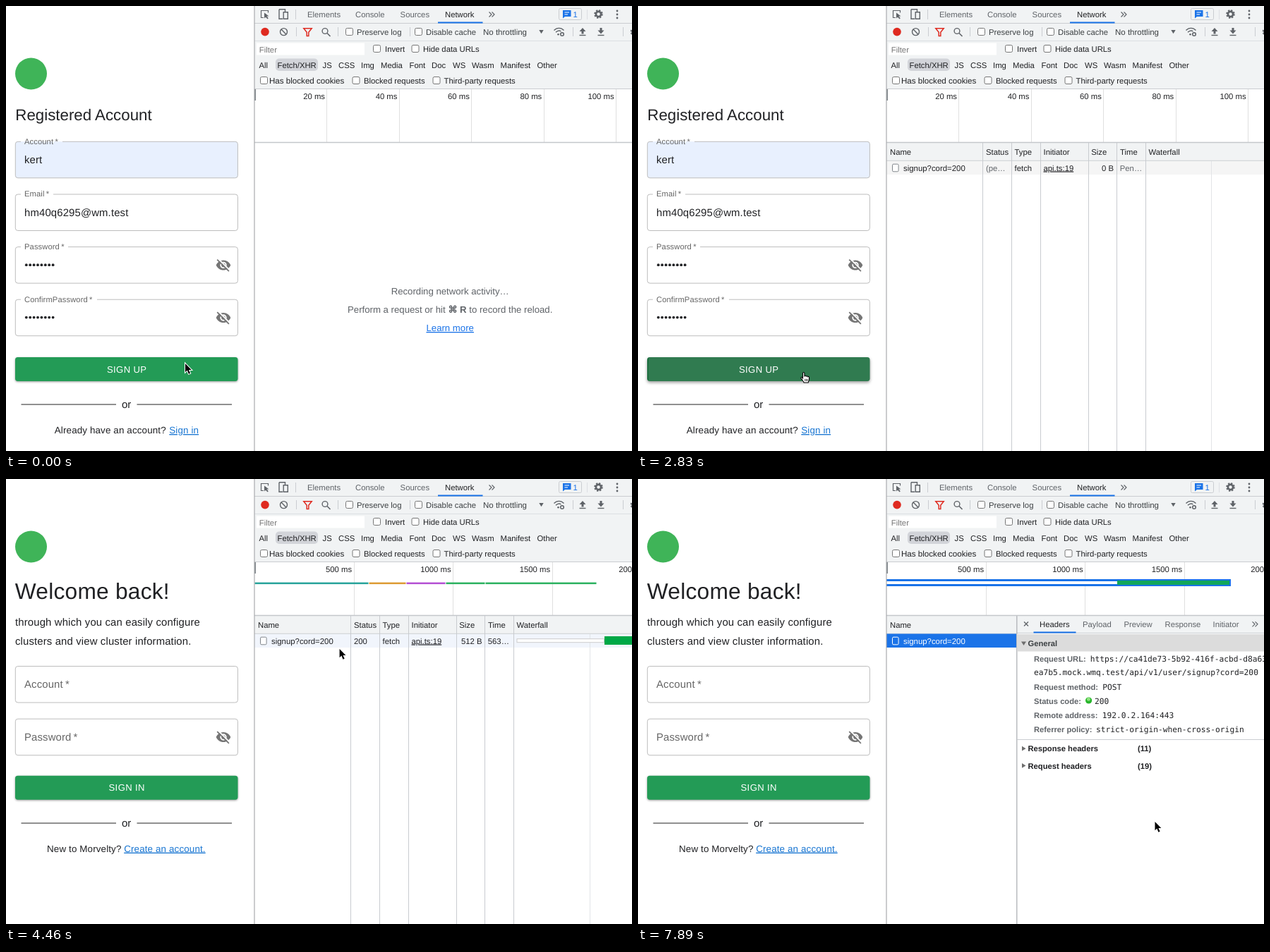
These frames come from a looping animation (887x631 px, 8000 ms). An HTML page:

```html
<!DOCTYPE html>
<html lang="en">
<head>
<meta charset="utf-8">
<title>Sign up flow</title>
<style>
html, body { margin: 0; width: 100%; height: 100%; overflow: hidden; background: #fff; }
svg { display: block; font-family: "Liberation Sans", Arial, sans-serif; text-rendering: geometricPrecision; }
text { white-space: pre; }
.mono { font-family: "DejaVu Sans Mono", monospace; }
.tip { font-family: Inter, sans-serif; }
.b { font-weight: 700; }
.u { text-decoration: underline; }
</style>
</head>
<body>
<svg id="stage" width="887" height="631" viewBox="0 0 887 631"></svg>
<script>
const INK = '#202124', GREY = '#5f6368', LINE = '#cacdd1', BAR = '#f1f3f4', BLUE = '#1a73e8';
const LIGHT = [35, 155, 86], DARK = [24, 108, 60];

// ---- drawing helpers ----
const text = (x, y, s, { size = 11.3, fill = INK, cls = '', anchor = 'start', ls = 0 } = {}) =>
  `<text x="${x}" y="${y}" font-size="${size}" fill="${fill}" class="${cls}" text-anchor="${anchor}" letter-spacing="${ls}">${s}</text>`;
const rect = (x, y, w, h, fill, extra = '') =>
  `<rect x="${x}" y="${y}" width="${w}" height="${h}" fill="${fill}" ${extra}/>`;
const path = (d, stroke = GREY, w = 1.3, fill = 'none') =>
  `<path d="${d}" stroke="${stroke}" stroke-width="${w}" fill="${fill}"/>`;
const circle = (x, y, r, fill, extra = '') => `<circle cx="${x}" cy="${y}" r="${r}" fill="${fill}" ${extra}/>`;
const hline = (x1, x2, y, c = LINE, w = 1) => path(`M${x1} ${y}H${x2}`, c, w);
const vline = (x, y1, y2, c = LINE, w = 1) => path(`M${x} ${y1}V${y2}`, c, w);
const group = (id, body) => `<g id="${id}">${body}</g>`;
const row = (y, items, opt) => items.map(([x, s]) => text(x, y, s, opt)).join('');
const check = (x, y) => rect(x + .5, y + .5, 10, 10, '#fff', 'rx="2" stroke="#767676"');
const more = (x, y) => path(`M${x} ${y - 3.5}l3.5 3.5l-3.5 3.5M${x + 4} ${y - 3.5}l3.5 3.5l-3.5 3.5`, GREY, 1.2);
const gear = (x, y) => circle(x, y, 3.6, 'none', `stroke="${GREY}" stroke-width="2.6"`) +
  circle(x, y, 5.4, 'none', `stroke="${GREY}" stroke-width="1.8" stroke-dasharray="2.3 1.94"`);

// ---- left pages ----
const body = { size: 14.9, ls: .14 };
const small = { size: 13.4, ls: .13 };

function eye(y) {
  return `<g transform="translate(296.8 ${y - 11.2}) scale(.935)">
    <path fill="#757575" fill-rule="evenodd" d="M1 12C2.7 7.6 7 4.5 12 4.5S21.3 7.6 23 12C21.3 16.4 17 19.5 12 19.5S2.7 16.4 1 12ZM7 12a5 5 0 0 0 10 0a5 5 0 0 0 -10 0Z"/>
    ${circle(12, 12, 3, '#757575')}
    ${path('M4 2.2L22 20.2', '#fff', 2)}${path('M2.6 3.6L20.4 21.4', '#757575', 1.9)}</g>`;
}

// Outlined field; the top border is open between x = 21 and gap.
function field(y, label, gap, fill = 'none') {
  const l = 13.3, r = 328.4, b = y + 51.5, k = 3.6;
  const start = gap || 21;
  const edge = `M${start} ${y}H${r - k}q${k} 0 ${k} ${k}V${b - k}q0 ${k} ${-k} ${k}H${l + k}q${-k} 0 ${-k} ${-k}V${y + k}q0 ${-k} ${k} ${-k}H21`;
  return rect(l, y, r - l, 51.5, fill, `rx="${k}"`) + path(edge, '#bdbdbd', 1) +
    (gap ? text(26, y + 3.4, label + '\u2009*', { size: 11.2, ls: .1, fill: '#666' })
         : text(26, y + 30.6, label + '\u2009*', { ...body, fill: '#666' }));
}
const dots = y => Array.from({ length: 8 }, (_, i) => circle(28.8 + 5.4 * i, y, 1.9, INK)).join('');
const divider = y => hline(21.5, 156, y, '#6b6b6b', 1.5) + hline(185.5, 320, y, '#6b6b6b', 1.5) +
  text(170.7, y + 5, 'or', { size: 15, anchor: 'middle' });
const button = (id, y) => rect(13, y, 315.5, 34, `rgb(${LIGHT})`, `id="${id}" rx="3.7"`);
const caption = (y, s) => text(171.2, y, s, { size: 13.1, ls: .37, fill: '#fff', anchor: 'middle' });

const signUp = text(13.3, 162, 'Registered Account', { size: 22.3 }) +
  field(192.3, 'Account', 80, '#e8f0fe') + text(26, 223.2, 'kert', body) +
  field(267, 'Email', 67) + text(26, 298, 'hm40q6295@wm.test', body) +
  field(341.6, 'Password', 88) + dots(367.2) + eye(367.4) +
  field(416.2, 'ConfirmPassword', 129) + dots(441.6) + eye(442) +
  button('btn', 498) +
  `<clipPath id="clip">${rect(13, 498, 315.5, 34, '#fff', 'rx="3.7"')}</clipPath>` +
  `<g clip-path="url(#clip)"><circle id="ripple" cx="235.5" cy="516.5" fill="#fff"/></g>` +
  caption(519.6, 'SIGN UP') + divider(565) +
  text(68.8, 606, 'Already have an account?', small) +
  text(231.3, 606, 'Sign in', { ...small, fill: '#1976d2', cls: 'u' });

const signIn = text(12.8, 169.6, 'Welcome back!', { size: 31.7, ls: .23 }) +
  text(13, 208.4, 'through which you can easily configure', body) +
  text(13, 234.6, 'clusters and view cluster information.', body) +
  field(265.5, 'Account') + field(340.2, 'Password') + eye(366) +
  button('btnIn', 420.7) + caption(442.2, 'SIGN IN') + divider(488) +
  text(58, 528.6, 'New to Morvelty?', small) +
  text(167.2, 528.6, 'Create an account.', { ...small, fill: '#1976d2', cls: 'u' });

// ---- developer tools ----
const tools = rect(352, 0, 535, 118, BAR) +
  hline(352, 887, 24.5) + hline(352, 887, 49.5, '#dcdfe3') + hline(352, 887, 117.5) +
  path('M365 16.5H361.5V6.5H371.5V9.5', GREY, 1.2) + path('M366 9.5V17.5L368 15.7L370.5 18.5L371.8 17.2L369.4 14.6H372.5Z', 'none', 0, GREY) +
  path('M387 4.7H395.5V8M387 4.7V18.3H392', GREY, 1.4) + path('M393.2 8.7H399.3V18.3H393.2Z', GREY, 1.4) +
  vline(410.5, 5, 19) +
  row(16, [[427, 'Elements'], [495, 'Console'], [558.6, 'Sources']], { fill: GREY }) +
  text(622, 16, 'Network') + rect(612, 22.5, 63.5, 2, BLUE) + more(684.5, 12) +
  rect(783.5, 3.5, 32, 16, BAR, `rx="2" stroke="${LINE}"`) +
  path('M789 6H800.5V15H792L789 17.5Z', 'none', 0, BLUE) + path('M791.5 9H798M791.5 12H796', '#fff', 1) +
  text(803.5, 15.5, '1', { fill: BLUE }) + vline(823.5, 5, 19, '#dcdfe3') + gear(839.5, 11.5) +
  [7, 12, 17].map(y => circle(866, y, 1.4, GREY)).join('') +

  circle(367, 36.6, 5.8, '#df2a20') +
  circle(393.5, 36.6, 5, 'none', `stroke="${GREY}" stroke-width="1.4"`) + path('M390 33L397 40.2', GREY, 1.4) +
  vline(411.5, 30, 43) + path('M421.8 31.7H433.2L428.8 37.3V42.5H426.2V37.3Z', '#df2a20', 1.5) +
  circle(452, 35.5, 3.9, 'none', `stroke="${GREY}" stroke-width="1.4"`) + path('M455 38.5L459.5 43', GREY, 1.6) +
  vline(470.5, 30, 43) + check(481, 31) + vline(572.5, 30, 43) + check(579, 31) +
  row(40.6, [[497, 'Preserve log'], [595, 'Disable cache']], { fill: '#3c4043' }) +
  text(676, 40.6, 'No throttling', { size: 11.5, fill: '#3c4043' }) + path('M755.3 34H761.7L758.5 39.3Z', 'none', 0, GREY) +
  path('M776.5 34.5C780.5 30.3 786.5 30.3 790.5 34.5M779 37.3C781.5 34.8 784.5 34.6 786.5 36', GREY, 1.4) +
  circle(788, 40, 2.3, 'none', `stroke="${GREY}" stroke-width="1.5"`) + circle(782.5, 40.3, 1.3, GREY) +
  vline(803.5, 30, 43) +
  path('M817 31L821.5 36H818.5V39.5H815.5V36H812.5Z', 'none', 0, GREY) + hline(812.5, 821.5, 41.5, GREY, 1.4) +
  path('M843 39.5L847.5 34.5H844.5V31H841.5V34.5H838.5Z', 'none', 0, GREY) + hline(838.5, 847.5, 41.5, GREY, 1.4) +
  vline(874.5, 30, 43) + gear(891, 36.6) +

  rect(355, 52.5, 153, 17, '#fff') + text(358.8, 65.6, 'Filter', { fill: '#757575' }) +
  check(520, 55) + check(574.5, 55) + row(65, [[537, 'Invert'], [591, 'Hide data URLs']]) +
  rect(382, 74.5, 60, 17.5, '#d2d4d9', 'rx="5"') +
  row(87.5, [[358.5, 'All'], [384.5, 'Fetch/XHR'], [448.5, 'JS'], [471, 'CSS'], [503, 'Img'], [531, 'Media'], [571.5, 'Font'],
    [603, 'Doc'], [633, 'WS'], [660, 'Wasm'], [700.5, 'Manifest'], [752.5, 'Other']]) +
  check(360, 100) + check(490.5, 100) + check(604.5, 100) +
  text(373, 109.6, 'Has blocked cookies', { size: 11.6 }) + row(109.6, [[507, 'Blocked requests'], [620.6, 'Third-party requests']]);

function ruler(step, ms) {
  let s = '';
  for (let i = 1; i < 8; i++) {
    const x = 352 + step * i;
    s += vline(Math.round(x) + .5, 118, 193, '#e0e0e0') + text(x - 2.4, 132, i * ms + ' ms', { anchor: 'end' });
  }
  return s;
}
// Connection phases, given as offsets in pixels at the final scale.
function phases(k, last) {
  const ends = [0, 162, 215, 271, 327, 485], colors = ['#27a39a', '#dc9a33', '#b44fd3', '#2bb15f', '#2bb15f'];
  return colors.slice(0, last).map((c, i) =>
    rect(352.5 + ends[i] * k, 146.6, (ends[i + 1] - ends[i]) * k - 1, 2.5, c)).join('');
}

const mid = { size: 13.2, fill: GREY, anchor: 'middle' };
const empty = text(629.2, 409, 'Recording network activity…', mid) +
  text(629.2, 435, 'Perform a request or hit <tspan class="b">⌘ R</tspan> to record the reload.', mid) +
  text(629.2, 461, 'Learn more', { ...mid, fill: BLUE, cls: 'u' });

const docIcon = c => rect(360.5, 224.2, 8.6, 10.6, '#fff', `rx="1.5" stroke="${c}"`);
function table(tint, gridX, cells) {
  return rect(352, 194, 535, 25, BAR) + hline(352, 887, 219.3) + rect(352, 220, 535, 19, tint) +
    vline(gridX, 220, 631, '#e2e4e7') +
    [488.5, 529.5, 570.5, 638.5, 678.5, 719.5].map(x => vline(x, 194, 631, '#c9ccd0')).join('') +
    row(210.6, [[357, 'Name'], [493, 'Status'], [533.6, 'Type'], [574.5, 'Initiator'], [642.3, 'Size'], [683, 'Time'], [723.5, 'Waterfall']]) +
    docIcon('#80868b') + text(376, 233.5, 'signup?cord=200', { size: 11.4 }) +
    text(533.6, 233.5, 'fetch') + text(574.5, 233.5, 'api.ts:19', { cls: 'u' }) + cells;
}
const waiting = text(493, 233.5, '(pe…', { fill: GREY }) + text(674, 233.5, '0 B', { anchor: 'end' }) +
  text(682.8, 233.5, 'Pen…', { fill: GREY });
const answered = text(493, 233.5, '200') + text(674.5, 233.5, '512 B', { anchor: 'end' }) + text(682.8, 233.5, '563…') +
  rect(724, 226.7, 123.5, 5, '#fff', 'stroke="#ccc"') + rect(848, 223, 39, 12, '#00a846');

const HOST = 'ca41de73-5b92-416f-acbd-';
const hint = { size: 10.4, fill: '#454545', cls: 'tip' };
const tooltip = rect(467.5, 251.5, 214.5, 45, '#dedede', 'rx="2" stroke="#c4c4c4" style="filter:drop-shadow(0 1px 1.5px rgba(0,0,0,.25))"') +
  text(473.3, 264.3, 'https://' + HOST, hint) + text(473.3, 277.3, 'd8a63c9ea7b5.mock.wmq.test/api/v1/user/', hint) +
  text(473.3, 290.3, 'signup?cord=200', hint);

const mono = { size: 11.24, cls: 'mono' };
const key = { size: 11.15, cls: 'b', fill: GREY };
const head = { size: 11.2, cls: 'b' };
const detail = rect(352, 142, 488, 10, BLUE) + rect(352, 145, 327, 4, '#fff') + rect(679, 144, 159, 6, '#12a65a') +
  rect(352, 194, 535, 437, '#fff') + rect(352, 194, 184, 25, BAR) + hline(352, 536, 219.3) + text(357, 210.6, 'Name') +
  rect(352, 219.5, 184, 19.5, BLUE) + rect(360.5, 224.2, 8.6, 10.6, 'none', 'rx="1.5" stroke="#fff"') +
  text(376, 233.5, 'signup?cord=200', { size: 11.4, fill: '#fff' }) +
  rect(537, 194, 350, 24.5, BAR) + hline(537, 887, 218.5) + vline(536.8, 194, 631, '#a8abaf', 1.2) +
  path('M547 202.5L553 208.5M553 202.5L547 208.5', GREY, 1.3) + text(569, 209.6, 'Headers') + rect(560.5, 216.5, 60, 2, BLUE) +
  row(209.6, [[630, 'Payload'], [688.5, 'Preview'], [746.5, 'Response'], [814.5, 'Initiator']], { fill: GREY }) + more(870.5, 205.8) +
  rect(537.5, 220, 349.5, 24.5, '#dcdcdc') + path('M543 230.5H550L546.5 236Z', 'none', 0, '#6e6e6e') +
  text(552.5, 237, 'General', { ...head, fill: '#3c4043' }) +
  [[259, 'Request URL:'], [298.5, 'Request method:'], [318.5, 'Status code:'], [338.5, 'Remote address:'], [358.5, 'Referrer policy:']]
    .map(([y, s]) => text(561, y, s, key)).join('') +
  text(640.8, 259, 'https://' + HOST + 'd8a63c9', mono) + text(561, 278, 'ea7b5.mock.wmq.test/api/v1/user/signup?cord=200', mono) +
  text(658.3, 298.5, 'POST', mono) + circle(638.6, 314, 4.6, '#27b52b') + circle(638.4, 312.3, 2.5, '#8ee27e') +
  text(647, 318.5, '200', mono) + text(657.8, 338.5, '192.0.2.164:443', mono) +
  text(649, 358.5, 'strict-origin-when-cross-origin', mono) + hline(537, 887, 369.5) +
  [[386.3, 'Response', 11], [410.5, 'Request', 19]].map(([y, s, n]) =>
    path(`M544 ${y - 7.5}V${y - .7}L549.5 ${y - 4.1}Z`, 'none', 0, '#6e6e6e') +
    text(552.5, y, s + ' headers', head) + text(708, y, `(${n})`, head)).join('');

// ---- cursors ----
const cursors = group('arrow', path('M0 0V12.2L2.8 9.6L4.9 14.7L7.1 13.8L4.9 8.9H8.8Z', '#fff', 2) +
    path('M0 0V12.2L2.8 9.6L4.9 14.7L7.1 13.8L4.9 8.9H8.8Z', 'none', 0, '#000')) +
  group('hand', path('M4 9.5V2.2C4 .6 6.4 .6 6.4 2.2V6.2C7 5.4 8.6 5.6 8.8 6.6C9.5 5.9 10.9 6.2 11 7.2C11.7 6.7 13 7 13 8.3V11C13 13 12 13.5 11.7 15.5H5.6C5.2 13.8 3.2 12 1.6 9.6C.8 8.3 2.2 7.4 3 8.2Z', '#000', 1.1, '#fff') +
    path('M7.2 10.3V13.4M9 10.3V13.4M10.8 10.3V13.4', '#000', .8)) +
  group('beam', ['#fff', '#000'].map((c, i) => path('M-3 -8Q-.4 -8 0 -6.5Q.4 -8 3 -8M0 -6.5V6.5M-3 8Q-.4 8 0 6.5Q.4 8 3 8M-1.8 3H1.8', c, i ? 1.2 : 2.8)).join(''));

const stage = document.getElementById('stage');
stage.innerHTML = rect(0, 0, 887, 631, '#fff') + circle(35.5, 96, 22.5, '#3fb458') +
  group('signUp', signUp) + group('signIn', signIn) + tools +
  group('scaleA', ruler(102.4, 20)) + group('scaleB', ruler(83.1, 200) + phases(1.479, 4)) +
  group('scaleC', ruler(140.5, 500)) + group('bars', phases(1, 5)) + rect(352, 118, 2, 16, '#80868b') +
  group('empty', empty) + group('pendingA', table('#f5f5f5', 812.5, waiting)) + group('pendingB', table('#f5f5f5', 827.5, waiting)) +
  group('done', table('#f1f5fc', 827.5, answered)) + group('detail', detail) +
  hline(352, 887, 193.5, '#c4c7cb', 1.5) + vline(352, 0, 631, '#a9abae', 1.2) +
  group('tooltip', tooltip) + cursors;

// ---- timeline ----
const LOOP = 8000;
const moves = [
  [0, 'arrow', 254, 507], [140, 'arrow', 243, 541], [290, 'arrow', 232, 529], [440, 'hand', 229.5, 518.5], [3720, 'beam', 286.7, 463.5],
  [3870, 'arrow', 410, 335], [4020, 'arrow', 440, 307], [4310, 'arrow', 461, 274], [4460, 'arrow', 472.6, 241],
  [4610, 'arrow', 470, 236], [4750, 'arrow', 467.5, 235], [5350, 'arrow', 466.8, 234.7], [6850, 'arrow', 715, 320],
  [7000, 'arrow', 743, 344], [7140, 'arrow', 724, 350], [7290, 'arrow', 722, 352], [7890, 'arrow', 732.5, 486]];
// time, hover amount, elevation, ripple radius, ripple opacity
const press = [[0, 0, 2, 0, 0], [440, .55, 3, 0, 0], [580, 1, 4, 0, 0], [2530, 1, 8, 23.5, .14],
  [2680, 1, 8, 160, .2], [2830, 1, 4, 221, .1], [2980, 1, 4, 0, 0], [3870, 0, 2, 0, 0]];
const shows = { signUp: [0, 4460], signIn: [4460, LOOP], scaleA: [0, 3870], scaleB: [3870, 4460], scaleC: [4460, LOOP],
  bars: [4460, 6250], empty: [0, 2680], pendingA: [2680, 3870], pendingB: [3870, 4460], done: [4460, 6250],
  tooltip: [6100, 6250], detail: [6250, LOOP] };

const el = id => document.getElementById(id);
const at = (list, t) => list.filter(k => k[0] <= t).pop();
const shadow = n => `drop-shadow(0 ${.6 + n * .38}px ${.8 + n * .36}px rgba(0,0,0,.4))`;
el('btnIn').style.filter = shadow(2);

function draw(t) {
  for (const [id, [from, to]] of Object.entries(shows)) el(id).style.display = t >= from && t < to ? '' : 'none';
  const [, hover, lift, r, o] = at(press, t);
  el('btn').setAttribute('fill', `rgb(${LIGHT.map((c, i) => Math.round(c + (DARK[i] - c) * hover))})`);
  el('btn').style.filter = shadow(lift);
  el('ripple').setAttribute('r', r);
  el('ripple').setAttribute('opacity', o);
  const [, kind, x, y] = at(moves, t);
  for (const id of ['arrow', 'hand', 'beam']) el(id).style.display = id === kind ? '' : 'none';
  el(kind).setAttribute('transform', `translate(${x} ${y})`);
}

const begin = performance.now();
function tick() {
  draw((performance.now() - begin) % LOOP);
  requestAnimationFrame(tick);
}
tick();
</script>
</body>
</html>
```
